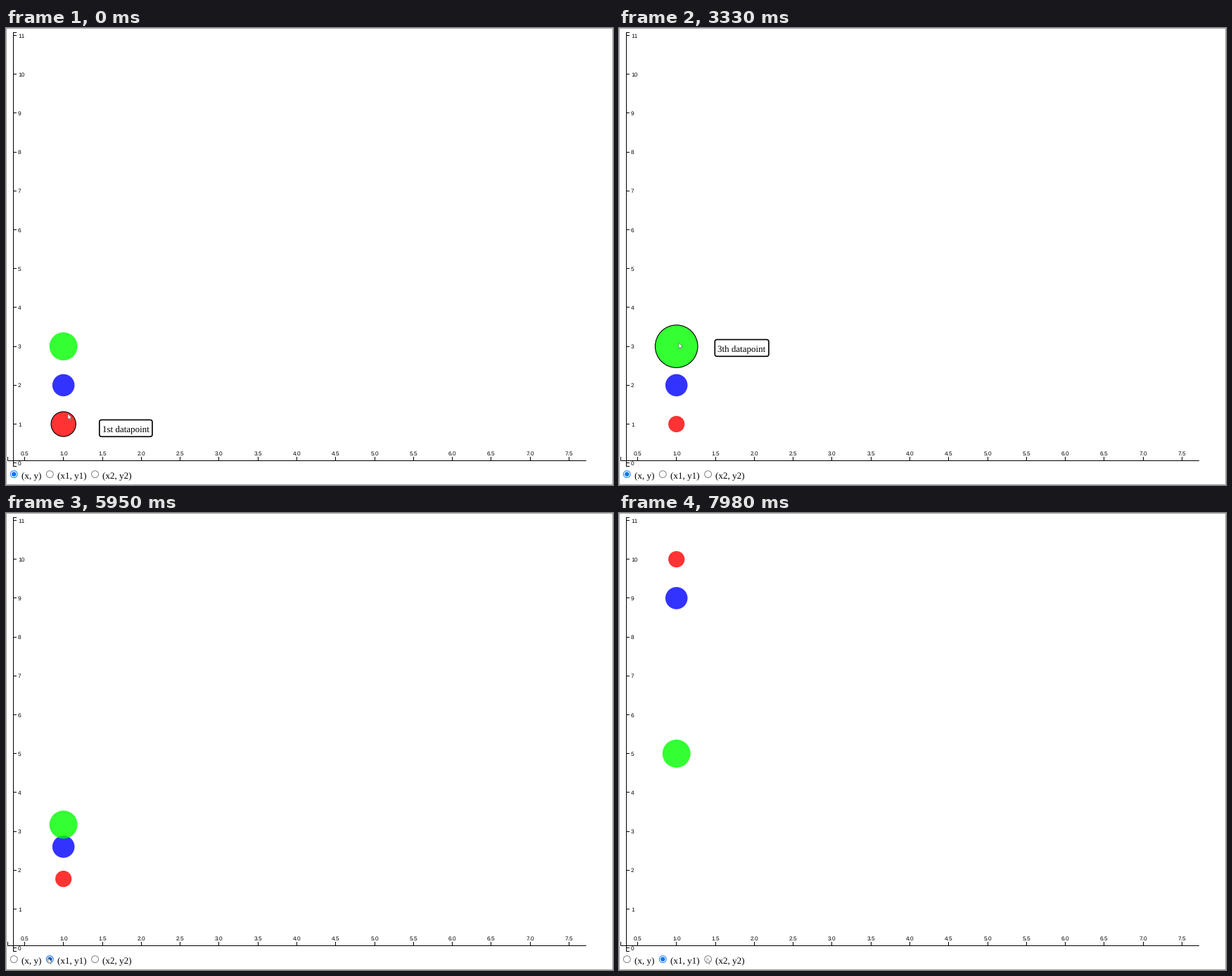
A matplotlib script for the animation above (8 s loop, 863 px wide and 649 px high).

```python
import numpy as np
import matplotlib.pyplot as plt
from matplotlib.animation import FuncAnimation
from matplotlib.collections import LineCollection
from matplotlib.patches import Circle, FancyBboxPatch, Polygon

W, H, DPI = 863, 649, 64
PT = 72 / DPI              # points per pixel
STEP, LOOP = 20, 8000      # ms
TIP_LAG = 80               # the tooltip trails the cursor
GROW, SWELL = 100, 0.52    # hover transition
CLICK, SLIDE = 5280, 2370  # radio click and move to the new values
ZOOM = 0.83                # page zoom

plt.rcParams["text.hinting"] = "no_hinting"
plt.rcParams["text.kerning_factor"] = 6
fig = plt.figure(figsize=(W / DPI, H / DPI), dpi=DPI, facecolor="white")
ax = fig.add_axes([0, 0, 1, 1])
ax.set(xlim=(0, W), ylim=(H, 0))
ax.axis("off")


def sx(v):
    return 26.6 + (v - 0.5) * 110.54


def sy(v):
    return 617.7 - 55.2 * v


def crisp(v):
    return np.floor(v) + 0.5


def label(x, y, s, size, font, **kw):
    return ax.text(x, y, s, fontsize=size * PT, family=font, va="baseline", **kw)


def lines(segments, color):
    group = LineCollection(segments, colors=color, linewidths=PT)
    group.set_snap(False)
    ax.add_collection(group)


def put(patch, z):
    patch.set_zorder(z)
    return ax.add_patch(patch)


# page border and axes
L, T, R, B = 0.5, 0.5, W - 0.5, H - 0.5
lines([[(L, T), (R, T), (R, B), (L, B), (L, T)]], "#a6a6a6")

xticks = np.arange(0.5, 7.6, 0.5)
yticks = np.arange(12)
axis = [[(2.5, 609), (2.5, 614.5), (825, 614.5)],
        [(15, 6.5), (10.5, 6.5), (10.5, 622.5), (15, 622.5)]]
axis += [[(x, 609), (x, 614.5)] for x in crisp(sx(xticks))]
axis += [[(10.5, y), (15, y)] for y in crisp(sy(yticks))]
lines(axis, "black")
for v in xticks:
    label(sx(v), 607, f"{v:.1f}", 8.4, "Liberation Sans", ha="center")
for v in yticks:
    label(17, sy(v) + 3, str(v), 8.4, "Liberation Sans")

# radio buttons
RADIO_Y = 633.7
radios = []
for x, s in zip((11.3, 62.3, 126.6), ("(x, y)", "(x1, y1)", "(x2, y2)")):
    ring = put(Circle((x, RADIO_Y), 4.95, fc="white", lw=0.9 * PT), 2)
    knob = put(Circle((x, RADIO_Y), 3.2, lw=0), 3)
    radios.append((ring, knob))
    label(x + 10.6, 639, s, 13.1, "Liberation Serif")

# data points: colour, start and end value
DOT_X = 81.7
DOTS = [("red", 1, 10), ("blue", 2, 9), ("lime", 3, 5)]
RADII = [ZOOM * (14 + 5 * i) for i in range(3)]
dots = [put(Circle((DOT_X, sy(a)), r, fc=(c, .8), ec="black", lw=0), 4)
        for (c, a, _), r in zip(DOTS, RADII)]

# cursor: start point, then moves as (from ms, to ms, x, y)
START = (81.5, 561)
MOVES = [(-1, 0, 88, 548),
         (290, 520, 84, 505),
         (1640, 2020, 84.5, 443.5),
         (3080, 3240, 85, 447),
         (3470, 3590, 85.5, 451.5),
         (3790, 4310, 73, 572),
         (4540, 4860, 60, 632),
         (7380, 7980, 125, 632)]
ARROW = np.array([(0, 0), (0, 7.8), (1.8, 6.2), (3, 9), (4.2, 8.5),
                  (3, 5.8), (5.5, 5.8)])
arrow = put(Polygon(ARROW, closed=True, fc="white", ec="#444444", lw=0.4 * PT), 9)

# tooltip
NAMES = [f"{n} datapoint" for n in ("1st", "2nd", "3th")]
tip_text = label(0, 0, "", 13.05, "Liberation Serif", zorder=7)
tip_box = put(FancyBboxPatch((0, 0), 10, 10, boxstyle="round,pad=0,rounding_size=3.2",
                             fc="white", ec="black", lw=2 * ZOOM * PT), 6)


def text_width(s):
    tip_text.set_text(s)
    return tip_text.get_window_extent().width


WIDTHS = [text_width(s) for s in NAMES]


def ramp(t, start, end):
    return min(max((t - start) / (end - start), 0), 1)


def cubic_in_out(u):
    return 4 * u ** 3 if u < .5 else 1 - 4 * (1 - u) ** 3


def cursor(t):
    pos = np.array(START, float)
    for start, end, x, y in MOVES:
        u = ramp(t, start, end)
        pos += (np.array((x, y)) - pos) * (1 - (1 - u) ** 2)
    return pos


def near(pos, x, y, r):
    return np.hypot(pos[0] - x, pos[1] - y) < r


def simulate():
    """Hovered point and swell of every point, for each frame."""
    swell, states = np.array([1.0, 0, 0]), []
    for t in range(0, LOOP, STEP):
        pos = cursor(t)
        hot = next((i for i, r in enumerate(RADII)
                    if near(pos, DOT_X, sy(DOTS[i][1]), r * (1 + SWELL * swell[i]))), None)
        goal = np.array([i == hot for i in range(3)], float)
        swell = swell + np.clip(goal - swell, -STEP / GROW, STEP / GROW)
        states.append((hot, swell))
    return states


STATES = simulate()


def draw_dots(t, hot, swell):
    slide = cubic_in_out(ramp(t, CLICK, CLICK + SLIDE))
    for i, (dot, (_, a, b)) in enumerate(zip(dots, DOTS)):
        dot.set_radius(RADII[i] * (1 + SWELL * swell[i]))
        dot.center = (DOT_X, sy(a + (b - a) * slide))
        dot.set_linewidth(1.1 * PT if i == hot else 0)


def draw_radios(t):
    pos = cursor(t - TIP_LAG)
    for i, (ring, knob) in enumerate(radios):
        on = i == (t >= CLICK)
        over = near(pos, *ring.center, knob.radius)
        if on:
            color = "#005cc8" if over else "#0075ff"
        else:
            color = "#4a4a4a" if over else "#767676"
        ring.set_edgecolor(color)
        knob.set_facecolor(color)
        knob.set_visible(on)


def draw_tip(t, hot):
    shown = hot is not None
    tip_box.set_visible(shown)
    tip_text.set_visible(shown)
    if shown:
        x, y = cursor(t - TIP_LAG) + (50.5, -5.3)
        tip_box.set_bounds(x + .8, y + .8, WIDTHS[hot] + 8.4, 23.8)
        tip_text.set_text(NAMES[hot])
        tip_text.set_position((x + 5, y + 17.3))


def update(n):
    t = n * STEP
    hot, swell = STATES[n]
    draw_dots(t, hot, swell)
    draw_radios(t)
    draw_tip(t, hot)
    arrow.set_xy(ARROW + cursor(t))
    return []


anim = FuncAnimation(fig, update, frames=LOOP // STEP, interval=STEP,
                     repeat=True, repeat_delay=0, cache_frame_data=False)
plt.show()
```
